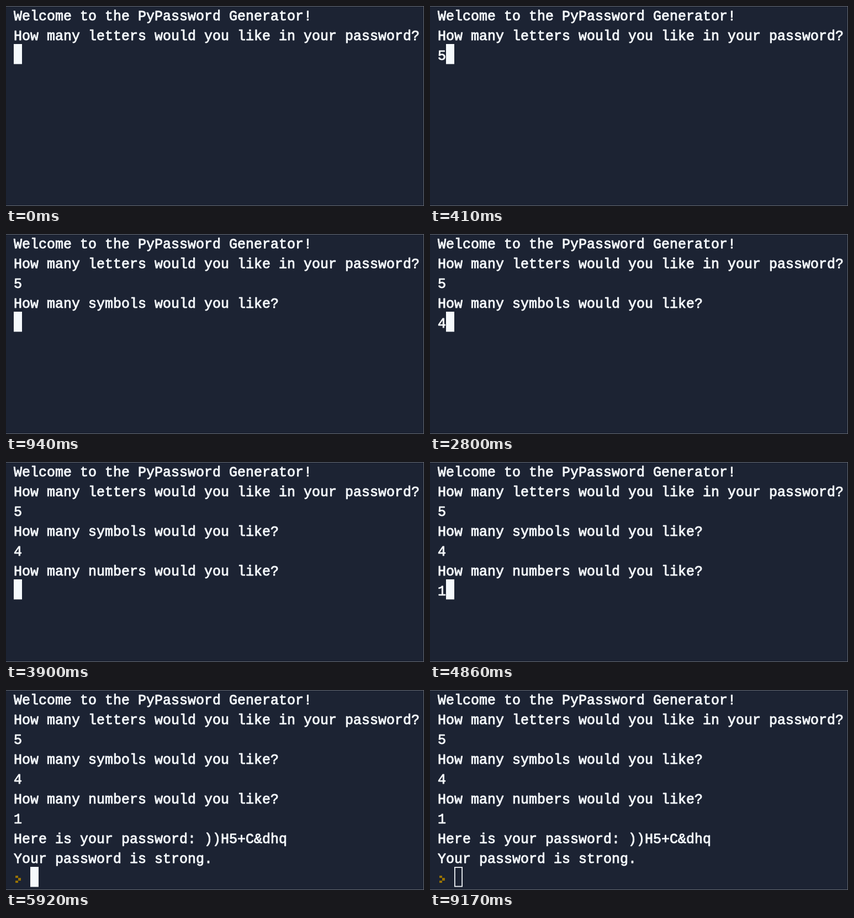
Write an HTML page with a canvas that moves like this. It is 757 px wide and 363 px high and loops after 9200 ms.

```html
<!DOCTYPE html>
<html lang="en">
<head>
<meta charset="utf-8">
<title>Password generator terminal</title>
<style>
  html, body { margin: 0; width: 100%; height: 100%; overflow: hidden; background: #1c2333; }
  canvas { display: block; }
</style>
</head>
<body>
<canvas id="stage" width="757" height="363"></canvas>
<script>
const W = 757, H = 363, LOOP = 9200;
const LEFT = 14, CELL = 15, ROW = 36, TOP = -3, BASELINE = 29;
const CURSOR_H = 36.4, OUTLINE = 1.75;
const BG = '#1c2333', FG = '#f5f9fc', EDGE = '#666a73', PROMPT = '#977200';
const ctx = document.getElementById('stage').getContext('2d');

// Each line appears at its own time.
const lines = [
  [0, 'Welcome to the PyPassword Generator!'],
  [0, 'How many letters would you like in your password?'],
  [410, '5'],
  [940, 'How many symbols would you like?'],
  [2800, '4'],
  [3900, 'How many numbers would you like?'],
  [4860, '1'],
  [5920, 'Here is your password: ))H5+C&dhq'],
  [5920, 'Your password is strong.']
];

// Cursor positions: time, column, row.
const cursorStops = [
  [0, 0, 2], [410, 1, 2],
  [940, 0, 4], [2800, 1, 4],
  [3900, 0, 6], [4860, 1, 6],
  [5920, 2, 9]
];
const PROMPT_AT = 5920, BLUR_AT = 9170;

function box(color, x, y, w, h) {
  ctx.fillStyle = color;
  ctx.fillRect(x, y, w, h);
}

// A thin stroke gives the regular face a medium weight.
function drawText(t) {
  ctx.font = '25px "Liberation Mono", monospace';
  ctx.fillStyle = ctx.strokeStyle = FG;
  ctx.lineWidth = 0.9;
  ctx.lineJoin = 'round';
  lines.forEach(([start, text], row) => {
    if (t < start) return;
    const y = TOP + row * ROW + BASELINE;
    ctx.fillText(text, LEFT, y);
    ctx.strokeText(text, LEFT, y);
  });
}

function drawPrompt() {
  box(PROMPT, 17, 337, 5, 4);
  box(PROMPT, 22, 341, 5, 5);
  box(PROMPT, 17, 346, 5, 4);
}

function drawCursor(t) {
  const [, col, row] = cursorStops.filter(stop => t >= stop[0]).pop();
  const x = LEFT + col * CELL, y = TOP + row * ROW;
  box(FG, x, y, CELL, CURSOR_H);
  if (t >= BLUR_AT) {
    box(BG, x + OUTLINE, y + OUTLINE, CELL - 2 * OUTLINE, CURSOR_H - 2 * OUTLINE);
  }
}

function drawEdges() {
  box(EDGE, 0, 0, W, 1);
  box(EDGE, 0, H - 1, W, 1);
  box(EDGE, W - 1, 0, 1, H);
}

function draw(t) {
  box(BG, 0, 0, W, H);
  drawText(t);
  if (t >= PROMPT_AT) drawPrompt();
  drawCursor(t);
  drawEdges();
}

const begin = performance.now();
function tick() {
  draw((performance.now() - begin) % LOOP);
  requestAnimationFrame(tick);
}
tick();
</script>
</body>
</html>
```
